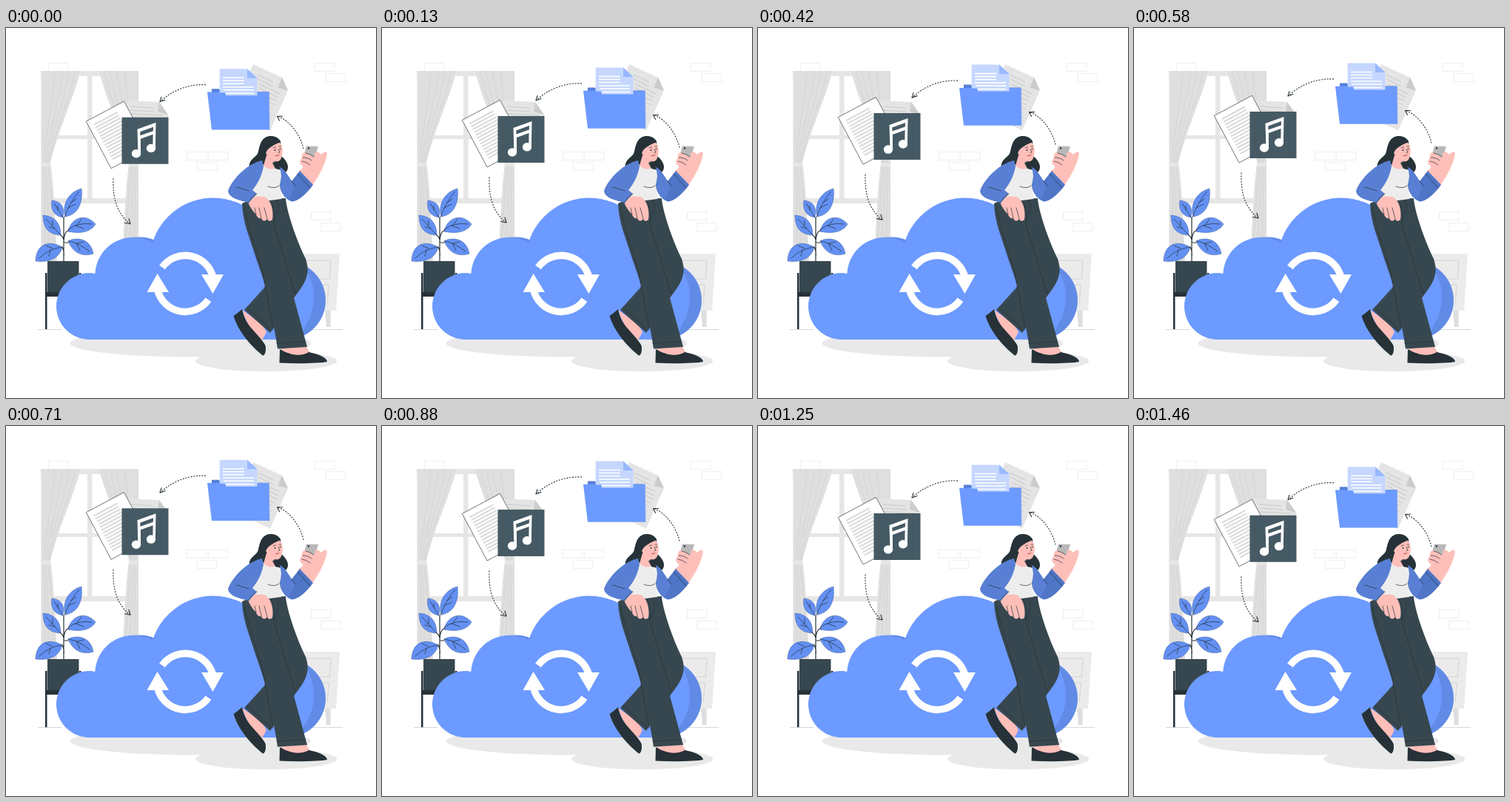
An HTML page for the animation above (1500 ms loop, 500 by 500 pixels).

```html
<!DOCTYPE html>
<html lang="en">
<head>
<meta charset="utf-8">
<title>Cloud sync</title>
<style>
html, body { margin: 0; width: 100%; height: 100%; overflow: hidden; background: #fff; }
svg { display: block; width: 100%; height: 100%; }
.line { fill: none; stroke: #263238; stroke-width: .7; stroke-linecap: round; stroke-linejoin: round; }
.dash { stroke-width: 1.1; stroke-dasharray: 2 1.7; stroke-linecap: butt; }
.head { stroke-width: 1.1; }
.blue { fill: #6c9aff; }
.shade { fill: #618be6; }
.sleeve { fill: #587fd3; }
.dark { fill: #263238; }
.slate { fill: #37474f; }
.skin { fill: #ffbfb9; }
.pale { fill: #ebebeb; }
</style>
</head>
<body>
<svg viewBox="0 0 500 500">
  <g id="bricks" fill="#fff" stroke="#ececec" stroke-width=".8"></g>

  <!-- Window and curtains -->
  <path fill="#fff" d="M47 58H179V315H47Z"/>
  <path fill="#e6e6e6" d="M47 58H179V65H47ZM110 65H116.5V231H110ZM60 145H166V150H60ZM60 230H166V237H60Z"/>
  <g id="curtain">
    <path fill="#dfdfdf" d="M47.4 58H101C91 95 70 140 60 182L61 188C65 225 67 265 69 315H47.4Z"/>
    <path fill="none" stroke="#d2d2d2" stroke-width=".8" d="M94 58C82 108 64 148 58 183M86 58C76 108 60 148 56 183M77 58C70 108 57 148 53 183M66 58C62 108 53 148 51 183M57 188C61 225 64 265 65 315M54 188C56 225 58 265 59 315M51 188C52 225 53 265 53 315"/>
    <path fill="#e6e6e6" d="M48 182H60V187H48Z"/>
  </g>
  <use href="#curtain" transform="matrix(-1 0 0 1 226.4 0)"/>

  <!-- Cabinet and floor -->
  <path stroke="#c9cdcf" stroke-width=".8" d="M43 407.5H75M405 407.5H455"/>
  <path fill="#dedede" d="M431 381H438.500V404H433Z"/>
  <path class="pale" d="M390 305H451L446 382H390Z"/>
  <path fill="none" stroke="#d3d3d3" d="M403 314H439L437.500 339H403ZM403 347H436L434.500 371H403Z"/>
  <g fill="#e9e9e9">
    <ellipse cx="249.500" cy="426" rx="163" ry="18.500"/>
    <ellipse cx="351.500" cy="450" rx="95.500" ry="14"/>
  </g>

  <!-- Plant -->
  <path class="dark" d="M53 331H55.500V357H99V331H101.500V407H99V363H55.500V407H53Z"/>
  <path class="slate" d="M56 315H98.500V357H56Z"/>
  <path fill="#6390f2" stroke="#3f5c9c" stroke-width=".5" d="M80 255C75 237 86 221 102 217C104 234 99 252 80 255ZM77 256C64 254 60 244 62 233C75 234 80 243 77 256ZM84 275C87 258 106 248 121 265C114 277 98 278 84 275ZM74 280C57 279 50 270 50 253C66 254 74 264 74 280ZM84 288C92 283 114 282 118 305C102 310 90 303 84 288ZM76 296C60 287 41 290 40 315C58 317 72 312 76 296Z"/>
  <path class="line" d="M79 256Q86 235 99 221M77 256L65 237M84 272Q98 262 116 265M74 280L54 258M84 288Q98 290 113 302M76 296Q58 298 45 311M84 243L94 238M88 236L95 231M70 246L70 240M96 266L102 258M94 267L105 271M63 268L63 260M66 271L58 269M97 291L105 289M95 290L100 301M63 298L54 294M60 300L58 308"/>
  <path class="line" style="stroke-width:1.2" d="M78 315V256M78 289Q78 276 85 273M78 309Q79 302 76 296M78 290H84M78 286Q77 282 74 280"/>

  <!-- Papers that stay put -->
  <path fill="#e4e4e4" d="M334 49L373 67L381 84L357 138.500L305 114Z"/>
  <path fill="#cccccc" d="M373 67L381 84L367 81Z"/>
  <path stroke="#d2d2d2" stroke-width="1.400" d="M340 63L361 73M341 69L361 79M343 76L370 89M342 81L368 94M342 87L366 99M344 94L363 104M346 101L361 109M350 110L359 115M353 119L357 121"/>
  <path fill="#e4e4e4" d="M163 98L207 100L219 117V160H163Z"/>
  <path fill="#cccccc" d="M207 100L219 117L205 113Z"/>
  <path stroke="#d2d2d2" stroke-width="1.600" d="M169 106L199 108M169 111L200 113M169 116L212 118M169 121L212 123"/>

  <!-- Everything that floats -->
  <g id="float">
    <g transform="translate(108.300 126) rotate(-28)">
      <path fill="#fff" stroke="#263238" stroke-width=".6" d="M0 0H58V72H0Z"/>
      <path id="pageLines" stroke="#d9d9d9" stroke-width="2"/>
    </g>
    <path fill="#455a64" d="M156.500 120.500H219.500V183.500H156.500Z"/>
    <g fill="#fff">
      <ellipse cx="176" cy="169.500" rx="6.200" ry="5.800"/>
      <ellipse cx="196" cy="162.300" rx="6.200" ry="5.800"/>
      <path d="M177.500 136.500L202.500 127.500L201.900 162H198.300L198.600 143.500L181.900 149.500L182.100 170H178.500ZM181.200 140L181.500 145L198.800 139L199 133.500Z"/>
    </g>
    <path fill="#5580da" d="M278 82H288L290 86H355.500V120H278Z"/>
    <path class="blue" d="M272 86.300H355.300L356.300 137.200H278Z"/>
    <path fill="#c5d7ff" d="M288.700 55H326L339.500 67.500V91H297L296 87H288.700Z"/>
    <path fill="#98b8ff" d="M326 55L339.500 67.500H326Z"/>
    <path stroke="#fff" stroke-width="1.600" d="M293 67H322M293 71H322M293 75H322M293 79.500H335M294 83.500H335M297 88H335"/>
    <path class="line dash" d="M270 76.500C245 75 222 86 209 99M145 203C144 230 150 250 167 264M402 163C398 145 384 125 368 119.500"/>
    <path class="line head" d="M210 93L208 99.500L215 97M160.500 263L168 264.500L166 257.500M373.500 119L366.500 119L369.500 125"/>
  </g>

  <!-- Cloud -->
  <circle class="shade" cx="379" cy="368" r="53"/>
  <path class="shade" d="M172 283Q190 281 201 287L196 296Z"/>
  <path class="blue" d="M113 421A45 45 0 0 1 113 331Q117 331 120.300 332A52 52 0 0 1 198 289.600A86 86 0 0 1 280 229.500A86 86 0 0 1 366 316L400 321C424 345 422 395 388 421Z"/>
  <g fill="none" stroke="#fff" stroke-width="9.600">
    <path d="M211 323.500A38.500 38.500 0 0 1 280 338M273.500 367.300A38.500 38.500 0 0 1 204.500 352.800"/>
    <path fill="#fff" stroke="none" d="M264 333H294L279.500 359ZM190.500 357H220L204.500 332Z"/>
  </g>

  <!-- Legs and shoes -->
  <path class="skin" d="M319 381L346 400L352 411L346 422C332 412 325 398 319 381ZM372 431H406L411 439C398 447 380 443 372 436Z"/>
  <path class="dark" d="M307.500 389C311 387 315 383 319 380C321 390 325 398 331 405C338 413 347 422 350.500 429C352 436 350 443 347 442.500C333 432 314 411 307.500 389ZM370 434L369.500 452.500C395 454 425 453 434 451C434 446 424 441 409 438C400 444 385 443 370 434Z"/>
  <path class="slate" d="M350 235L378 231C380 250 392 285 405 312C411 330 407 342 391 362L357 412L322 381L350 350L345 300Z"/>
  <path class="slate" d="M319 237C330 231 360 231 378 230C377 250 372 260 362 265L407 431L367 433.500C363 405 356 375 351 352C346 332 340 318 335 302C328 280 320 262 319 237Z"/>
  <path class="line" d="M362 265L391 360M350 349C354 368 358 390 361 408M326 378L359 408M358 232Q365 248 362 265M367 231Q371 247 362 262M366 426L405 424M322 242C329 280 343 308 350 345"/>

  <!-- Head, torso and arms -->
  <path class="dark" d="M357 146C345 147 343 158 341 167C339 176 327 176 329 190C334 185 340 186 346 187C358 196 374 198 379 194C384 187 379 179 372 173L371 153C367 147 362 146 357 146Z"/>
  <path fill="#ededed" d="M345 184L371 190C375 202 372 217 372 231Q350 235 327 233C335 217 339 200 345 184Z"/>
  <path class="skin" d="M352 172L348 186C353 191 360 192 364 189L362 177Z"/>
  <path class="dark" d="M360 182Q368 181 371 175L378 184L372 192L364 190Z"/>
  <path class="skin" d="M355 154C362 148 372 153 373.500 162C374.500 172 372 180.500 366 180.500C357 180 351 173 350.500 165Z"/>
  <path class="dark" d="M357 146.500C347 148 344 159 346 171C349 172 351 170 352 167C354 162 362 158 371 154C368 147 361 146 357 146.500Z"/>
  <path class="line" d="M361 162L364.500 161M369 160L371.500 160M368 164L370 168L368 168.500"/>
  <g class="dark"><circle cx="363.500" cy="165" r="1"/><circle cx="370.500" cy="163.500" r=".9"/></g>
  <path class="line" style="stroke:#b54545;stroke-width:1" d="M364.500 172.500Q367 173.500 369 171.500"/>
  <path class="skin" d="M329 227L349 228C359 232 362 249 360 259C357 262 354 261 353 258C350 262 346 261 345 257C341 258 339 255 338 252C334 248 329 241 327 235Z"/>
  <path class="line" d="M353 258L349 243M345 257L342 243M338 252L336 243"/>
  <path class="sleeve" d="M346 179C326 183 306 204 300 220C301 230 316 233 328 236L339 224L333 219C342 208 346 198 348 187Z"/>
  <path class="line" d="M328 220L312 215M328 236Q331 229 339 224M354 214Q363 218 369 213"/>
  <path fill="#b9b9b9" d="M406 159.500L422 160L415 182L400 180Z"/>
  <circle class="dark" cx="409" cy="162.500" r="1.200"/>
  <path class="skin" d="M395 193C402 190 403 188 399 185C396 182 397 178 400 176C399 171 402 167 405 168C409 170 413 173 416 174L418 169C420 166 423 167 425 171L430 168C433 166 434.500 169 433.500 172C431 184 425 197 413 214Z"/>
  <path class="line" d="M401 175Q408 175 413 179M400 180Q407 181 411 185M405 169Q411 170 416 174"/>
  <path fill="#4f75c6" d="M370 188C377 191 381 200 386 207L397 193L415 212C406 224 396 234 386 234.500C377 231 371 222 370 212Q374 200 370 188Z"/>
  <path class="sleeve" d="M370 188C377 191 381 200 386 207L391 214L382 232C375 228 371 221 370 212Q374 200 370 188Z"/>
  <path class="line" d="M386 207L391 214M394 197L411 216"/>
</svg>
<script>
const byId = id => document.getElementById(id);
const LOOP = 1500, LEAD = 20, RISE = 10, REST = .5;

byId('bricks').innerHTML = [
  [57, 47], [417, 47], [432, 61], [244, 167], [273, 167], [258, 181], [412, 248], [425, 263]
].map(([x, y]) => `<rect x="${x}.5" y="${y}.5" width="26.500" height="11"/>`).join('');

byId('pageLines').setAttribute('d',
  Array.from({ length: 13 }, (_, i) => `M7 ${9 + i * 4.4}H${i < 3 ? 43 : 51}`).join(''));

const start = performance.now();
function draw() {
  const p = (performance.now() - start + LEAD) % LOOP / LOOP;
  const y = REST - RISE * (1 - Math.abs(1 - 2 * p));
  byId('float').setAttribute('transform', `translate(0 ${y.toFixed(2)})`);
  requestAnimationFrame(draw);
}
draw();
</script>
</body>
</html>
```
